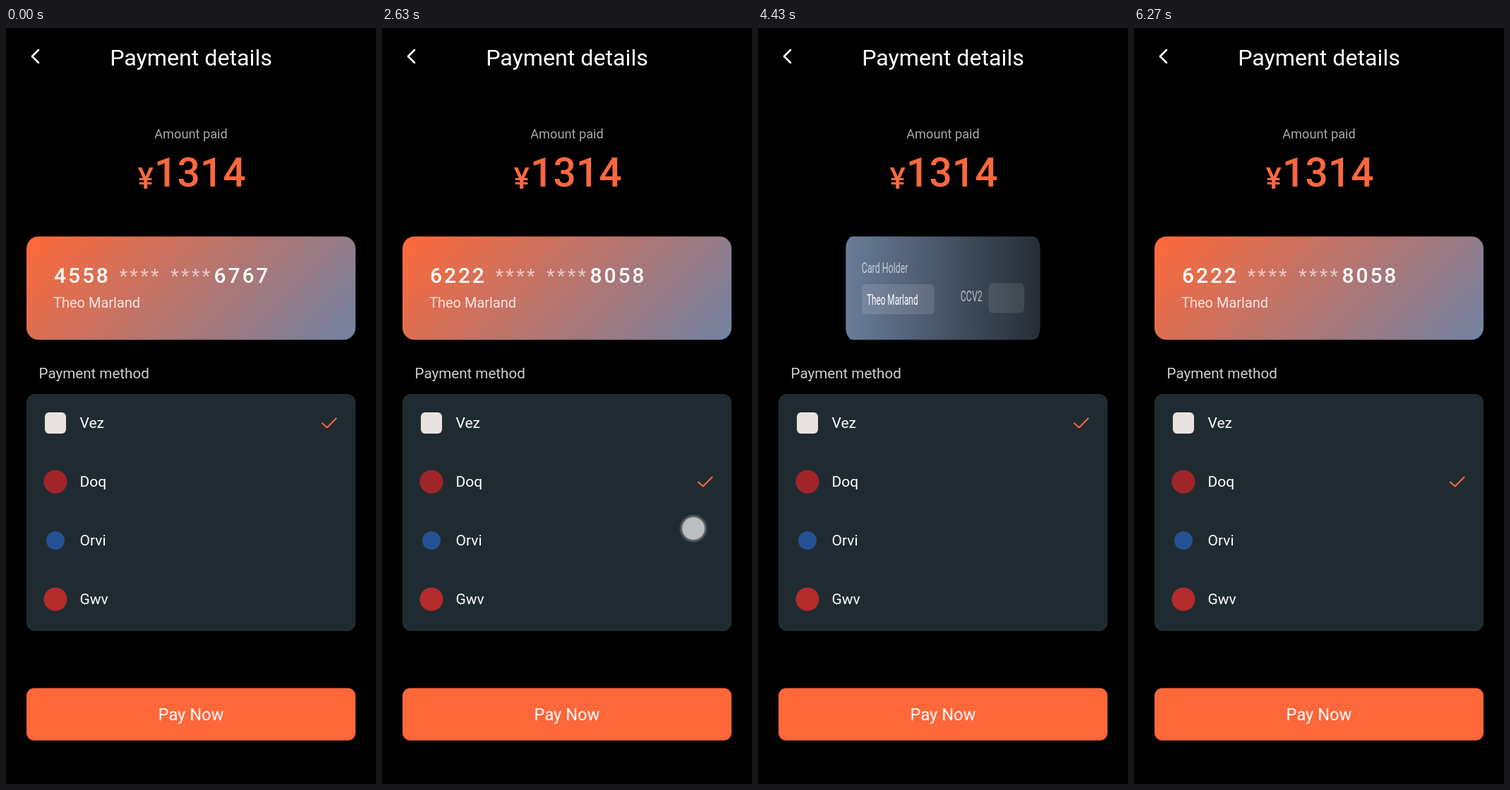
Animation of 524 by 1068 pixels, one loop 6.36 s. Source, as an HTML page:

```html
<!DOCTYPE html>
<html lang="en">
<head>
<meta charset="utf-8">
<title>Payment details</title>
<style>
  html, body { margin: 0; width: 100%; height: 100%; overflow: hidden; background: #000; }
  svg { display: block; width: 524px; height: 1068px; font-family: Roboto, "Noto Sans", sans-serif; fill: #fff; }
  .line { fill: none; stroke-linecap: round; stroke-linejoin: round; }
  .digits { font-size: 30px; font-weight: 500; letter-spacing: 2.9px; }
  .stars { font-size: 27px; letter-spacing: 3.2px; fill-opacity: .6; }
  .label { font-size: 21px; }
</style>
</head>
<body>
<svg viewBox="0 0 524 1068">
  <defs>
    <linearGradient id="warm" gradientUnits="userSpaceOnUse" x1="109" y1="214.5" x2="415" y2="520.5">
      <stop offset="0" stop-color="#ff6838"/>
      <stop offset="1" stop-color="#7082a3"/>
    </linearGradient>
    <linearGradient id="cool">
      <stop offset="0" stop-color="#697d99"/>
      <stop offset="1" stop-color="#262d35"/>
    </linearGradient>
    <radialGradient id="touch">
      <stop offset="0" stop-color="#e2e2e2"/>
      <stop offset=".74" stop-color="#e2e2e2"/>
      <stop offset=".8" stop-color="#dfe3ea" stop-opacity=".45"/>
      <stop offset="1" stop-color="#dfe3ea" stop-opacity="0"/>
    </radialGradient>
  </defs>
  <rect width="524" height="1068" fill="#000"/>

  <path class="line" d="M46 31L37 40L46 49" stroke="#fff" stroke-width="2.7"/>
  <text x="262" y="52.5" font-size="32.2" text-anchor="middle">Payment details</text>
  <text x="262" y="155.5" font-size="18.2" text-anchor="middle" fill="#a8a8a8">Amount paid</text>
  <g fill="#fb683f" font-weight="500">
    <text x="186.5" y="226.5" font-size="42">¥</text>
    <text x="210" y="224" font-size="57">1314</text>
  </g>

  <g id="front">
    <rect x="29" y="294.5" width="466" height="146" rx="17" fill="url(#warm)"/>
    <text id="head" class="digits" x="68" y="360"></text>
    <text class="stars" x="160.5" y="360">****</text>
    <text class="stars" x="233" y="360">****</text>
    <text id="tail" class="digits" x="294.5" y="360"></text>
    <text x="67" y="395" font-size="20" fill-opacity=".8">Theo Marland</text>
  </g>

  <g id="back">
    <rect x="29" y="294.5" width="466" height="146" rx="17" fill="url(#cool)"/>
    <text class="label" x="67" y="346" fill-opacity=".65">Card Holder</text>
    <rect x="67" y="362" width="174" height="42.5" rx="7" fill-opacity=".12"/>
    <text x="79" y="391" font-size="20">Theo Marland</text>
    <text class="label" x="304" y="386" fill-opacity=".65">CCV2</text>
    <rect x="371" y="360.5" width="86" height="42" rx="8" fill-opacity=".1"/>
  </g>

  <text x="46.5" y="494.5" font-size="20.6" fill="#cfcfcf">Payment method</text>
  <rect x="29" y="517" width="466" height="335" rx="12" fill="#202b31"/>
  <rect x="55" y="543" width="30" height="30" rx="6" fill="#e8e3e1"/>
  <circle cx="70" cy="641" r="16.5" fill="#a12429"/>
  <circle cx="70" cy="724" r="13" fill="#225293"/>
  <circle cx="70" cy="807" r="16.5" fill="#b32c2a"/>
  <g class="label">
    <text x="104.5" y="565">Vez</text>
    <text x="104.5" y="648">Doq</text>
    <text x="104.5" y="731">Orvi</text>
    <text x="104.5" y="814">Gwv</text>
  </g>
  <path id="check" class="line" d="M448 558.5L454.8 564.5L467.5 551.5" stroke="#e9683f" stroke-width="2.3"/>

  <rect x="29" y="932.5" width="466" height="74" rx="11" fill="#fe673a"/>
  <text x="262" y="977.5" font-size="23.7" text-anchor="middle">Pay Now</text>
  <circle id="finger" r="20.5" fill="url(#touch)"/>
</svg>
<script>
  const LOOP = 6360, PRESS = 42, FLIP = 774, CENTER = 262, ROW_STEP = 83;
  const numbers = [['4558', '6767'], ['6222', '8058'], ['6217', '3562']];
  // side 0 is the front of the card, side 1 the back; a cut turns it at once
  const cues = [
    { at: 100, x: 400, y: 970, row: 0, side: 1 },
    { at: 1730, row: 0, side: 0, cut: true },
    { at: 1765, x: 436, y: 640, row: 1, side: 0 },
    { at: 2630, x: 441, y: 707, row: 2, side: 0 },
    { at: 3170, x: 440, y: 560, row: 0, side: 0 },
    { at: 3900, x: 400, y: 970, row: 0, side: 1 },
    { at: 5100, x: 434, y: 608, row: 1, side: 0 }
  ];
  const $ = id => document.getElementById(id);
  const clamp = v => Math.min(1, Math.max(0, v));
  const ease = p => (1 - Math.cos(Math.PI * clamp(p))) / 2;

  function turn(face, scale) {
    face.setAttribute('visibility', scale > 0 ? 'visible' : 'hidden');
    if (scale > 0) face.setAttribute('transform', `translate(${CENTER * (1 - scale)} 0) scale(${scale} 1)`);
  }

  function draw(t) {
    let row = 0, side = 0, half = 0, alpha = 0;
    for (const cue of cues) {
      const age = t - cue.at;
      if (age < 0) break;
      if (cue.cut || age >= PRESS) row = cue.row;
      half = cue.cut ? cue.side : side + (cue.side - side) * ease((age - PRESS) / FLIP);
      side = cue.side;
      alpha = cue.cut ? 0 : .8 * clamp((360 - age) / 225);
      $('finger').setAttribute('cx', cue.x || 0);
      $('finger').setAttribute('cy', cue.y || 0);
    }
    const cos = Math.cos(Math.PI * half);
    turn($('front'), cos);
    turn($('back'), -cos);
    $('head').textContent = numbers[row][0];
    $('tail').textContent = numbers[row][1];
    $('check').setAttribute('transform', `translate(0 ${row * ROW_STEP})`);
    $('finger').setAttribute('opacity', alpha);
  }

  const start = performance.now();
  function tick() {
    draw((performance.now() - start) % LOOP);
    requestAnimationFrame(tick);
  }
  tick();
</script>
</body>
</html>
```
